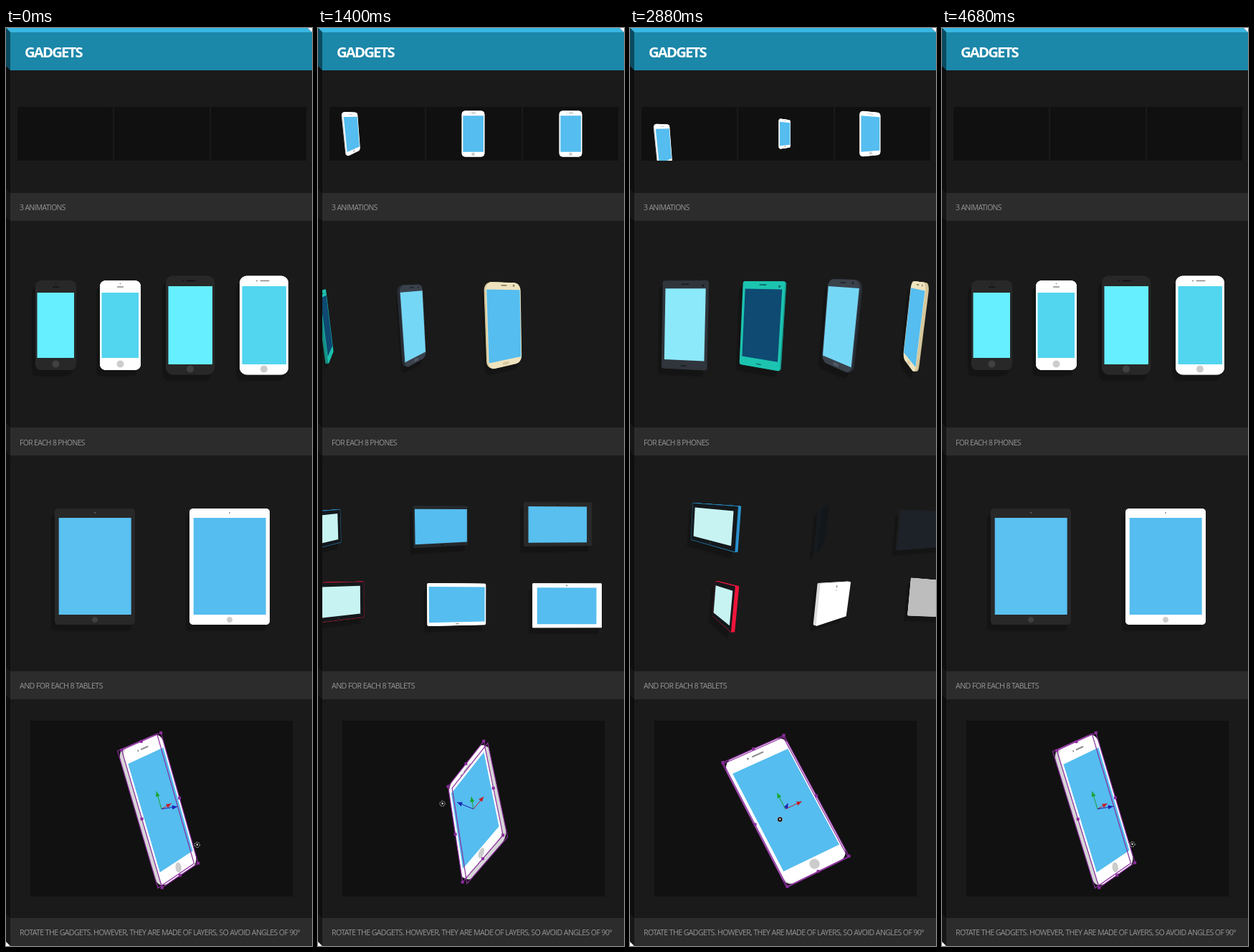
These frames come from a looping animation (427 by 1280 pixels, 4.72 s). An HTML page with a canvas:

```html
<!DOCTYPE html>
<html lang="en">
<head>
<meta charset="utf-8">
<title>Gadgets</title>
<style>
html, body { margin: 0; width: 100%; height: 100%; overflow: hidden; background: #1a1a1a; }
canvas { position: absolute; left: 0; top: 0; }
span {
  position: absolute; left: 19px; transform: translateY(-50%); white-space: nowrap; line-height: 1;
  font-family: "Open Sans", "Noto Sans", Roboto, sans-serif; font-stretch: 62.5%; font-weight: 400;
  letter-spacing: -.06em; color: #959595;
}
.title { left: 26px; font-weight: 700; letter-spacing: -.09em; color: #fff; }
</style>
</head>
<body>
<canvas id="stage" width="427" height="1280"></canvas>
<span class="title" style="top:33px" data-w="80" data-max="31">GADGETS</span>
<span style="top:250px" data-w="64" data-max="15">3 ANIMATIONS</span>
<span style="top:578px" data-w="91" data-max="15">FOR EACH 8 PHONES</span>
<span style="top:917px" data-w="116" data-max="15">AND FOR EACH 8 TABLETS</span>
<span style="top:1261px" data-w="392" data-max="15">ROTATE THE GADGETS. HOWEVER, THEY ARE MADE OF LAYERS, SO AVOID ANGLES OF 90°</span>
<script>
const ctx = document.getElementById('stage').getContext('2d');
const LOOP = 4720, TURN = LOOP / 2, CLIP = 2320, STEP = 40;
const SKY = '#55bdef', PURPLE = '#8a2c9c';
const THICK = 5;

// Largest font size that keeps each line inside its column
for (const el of document.querySelectorAll('span')) {
  el.style.fontSize = '100px';
  const full = el.getBoundingClientRect().width;
  el.style.fontSize = Math.min(el.dataset.max, 100 * el.dataset.w / full) + 'px';
}

const clamp = x => Math.min(1, Math.max(0, x));
const smooth = x => { x = clamp(x); return x * x * (3 - 2 * x); };
const rad = deg => deg * Math.PI / 180;

// ---- 3D: returns a function from gadget space to the stage ----
// Positive yaw brings the right side nearer, positive pitch sends the bottom away.
function view({ x, y, yaw = 0, pitch = 0, roll = 0, size = 1, k = 1, depth = 300 }) {
  const [cy, sy, cp, sp, cr, sr] = [yaw, pitch, roll].flatMap(a => [Math.cos(rad(a)), Math.sin(rad(a))]);
  return (px, py, pz = 0) => {
    const x1 = px * cy + pz * sy, z1 = pz * cy - px * sy;
    const y1 = py * cp - z1 * sp, z2 = py * sp + z1 * cp;
    const f = size * depth / (depth / k + z2 * size);
    return [x + (x1 * cr - y1 * sr) * f, y + (x1 * sr + y1 * cr) * f];
  };
}

// ---- drawing ----
function trace(points) {
  ctx.beginPath();
  points.forEach(([x, y]) => ctx.lineTo(x, y));
  ctx.closePath();
}

function poly(points, fill) {
  trace(points);
  ctx.fillStyle = fill;
  ctx.fill();
}

function bar(x, y, w, h, fill) {
  ctx.fillStyle = fill;
  ctx.fillRect(x, y, w, h);
}

function clipped(x, y, w, h, draw) {
  ctx.save();
  ctx.beginPath();
  ctx.rect(x, y, w, h);
  ctx.clip();
  draw();
  ctx.restore();
}

// Rounded box in the gadget's own coordinates, origin at its top left
function box(k, at, [x, y, w, h], r, fill, z = 0, dx = 0, dy = 0) {
  const pts = [];
  for (let c = 0; c < 4; c++) {
    const cx = c < 2 ? x + w - r : x + r, cy = c % 3 ? y + h - r : y + r;
    for (let i = 0; i <= 5; i++) {
      const a = (c - 1 + i / 5) * Math.PI / 2;
      const p = at(cx + r * Math.cos(a) - k.w / 2, cy + r * Math.sin(a) - k.h / 2, z);
      pts.push([p[0] + dx, p[1] + dy]);
    }
  }
  poly(pts, fill);
}

const corners = (k, at, z = 0) =>
  [[-1, -1], [1, -1], [1, 1], [-1, 1]].map(([u, v]) => at(u * k.w / 2, v * k.h / 2, z));

function facesUs(k, at) {
  const [a, b, c, d] = corners(k, at);
  return (c[0] - a[0]) * (d[1] - b[1]) > (d[0] - b[0]) * (c[1] - a[1]);
}

function device(k, at, shadow) {
  const shell = (fill, z, dx, dy) => box(k, at, [0, 0, k.w, k.h], k.r, fill, z, dx, dy);
  const front = facesUs(k, at), face = front ? 0 : THICK;
  const pill = ([x, y, w, h, fill]) => box(k, at, [x - w / 2, y - h / 2, w, h], Math.min(w, h) / 2, fill, face);
  if (shadow) {
    shell('rgba(0,0,0,.13)', 0, -4.5, 8);
    shell('rgba(0,0,0,.13)', 0, -5.5, 9.5);
  }
  for (let z = 0; z < THICK; z++) shell(k.side, front ? THICK - z : z);
  if (!front) {
    shell(k.back, THICK);
    k.rear.forEach(pill);
    return;
  }
  shell(k.rim || k.body);
  if (k.rim) box(k, at, [.8, .8, k.w - 1.6, k.h - 1.6], k.r, k.body);
  box(k, at, k.glass, 0, k.screen);
  k.parts.forEach(pill);
}

// ---- gadget kinds: size, corner radius, screen box, buttons as [x, y, w, h, colour] ----
const kind = (w, h, r, glass, parts, look) => ({ w, h, r, glass, parts, rear: [], back: look.body, ...look });
const dark = { body: '#282828', side: '#1f1f1f', back: '#202020', screen: '#66efff', btn: '#404040', ear: '#111' };
const white = { body: '#fff', side: '#d6d6d6', back: '#e2e2e2', screen: '#52d5ef', btn: '#ccc', ear: '#888' };

const small = look => kind(57, 125, 8, [2.5, 17, 51.5, 91],
  [[28.5, 116.5, 10, 10, look.btn], [28.5, 9, 9, 1.6, look.ear], [28.5, 4.5, 1.7, 1.7, look.ear]], look);
const large = look => kind(68, 138, 10, [3.5, 14.5, 61.5, 109],
  [[34, 130, 10, 10, look.btn], [35, 7, 13, 1.4, look.ear], [24, 7, 2, 2, look.ear]], look);
const slab = look => kind(65, 125, 3, [4, 11, 57, 101],
  [[32, 5, 11, 1.6, look.ear], [57, 7, 3, 3, look.ear], [32, 120, 8, 1.2, look.ear]],
  { rear: [[17, 11, 8, 8, look.ear], [32, 12, 4, 4, look.ear]], ...look });
const round = look => kind(66, 133, 12, [1.5, 11, 63, 111.5],
  [[33, 128, 13, 5, look.btn], [33, 4.5, 11, 1.6, look.ear], [52, 4.5, 3.4, 3.4, look.ear]], look);
const pad = look => kind(112, 162, 5, [5.7, 13, 101, 135],
  [[56, 155, 8, 8, look.btn], [56, 6, 1.8, 1.8, '#777']], look);
const edge = look => kind(98, 60, 1, [7, 7, 83, 46], [[48, 56.5, 3, 3, '#2b3236']],
  { body: '#14181b', screen: '#c8f3f3', rear: [[93, 6, 3.5, 3.5, '#123']], ...look });
const wide = look => kind(86, 61, 2, [2.2, 5, 82, 51], [[43, 58.5, 5, 1.4, look.ear]],
  { rear: [[43, 6, 4, 4, look.ear], [43, 12, 2, 2, look.ear]], ...look });
const frame = look => kind(97, 62, 1, [6.5, 6, 83, 51], [[48, 3, 2, 2, look.ear]], look);

const hero = large({ ...white, screen: SKY });
const graphite = slab({ body: '#30353c', side: '#20252b', back: '#222931', screen: '#8be9fa', ear: '#14181d' });
const teal = slab({ body: '#1cc4b0', side: '#168e84', screen: '#0e4a72', ear: '#0c5f58' });
const slate = round({ body: '#3a414b', side: '#272d35', screen: '#75d7f6', btn: '#505965', ear: '#1d2229' });
const cream = round({ body: '#efe3be', side: '#d5c79c', screen: SKY, btn: '#d6c9a1', ear: '#77705d' });
const blueEdge = edge({ rim: '#2276a6', side: '#2b93d0', back: '#2590cf' });
const redEdge = edge({ rim: '#8c1730', side: '#f0153c', back: '#e8113a' });
const wideDark = wide({ body: '#25282b', side: '#171b1f', back: '#12171b', screen: SKY, ear: '#15181a' });
const wideWhite = wide({ body: '#fff', side: '#ddd', screen: SKY, ear: '#999' });
const frameDark = frame({ body: '#292929', side: '#1e1e1e', back: '#1d2228', screen: '#58bfef', ear: '#151515' });
const frameWhite = frame({ body: '#fff', side: '#ccc', back: '#bdbdbd', screen: SKY, ear: '#777' });

// ---- groups; every later item leaves and arrives a little earlier ----
const phoneMove = { leave: 398, leaveGap: 98, spin: 975, reach: 1, enter: 1390, enterGap: 120, settle: 850 };
const groups = [
  { turn: 0, mid: 413, ...phoneMove,
    items: [[small(dark), 69.5, 414.5], [small(white), 159.5, 414.5], [large(dark), 257, 414.5], [large(white), 360, 414.5]] },
  { turn: 1, mid: 413, ...phoneMove,
    items: [[graphite, 70.5, 414.5], [teal, 167.5, 414.5], [slate, 267, 414], [cream, 363, 414.5]] },
  { turn: 0, mid: 747, leave: 220, leaveGap: 60, spin: 800, reach: 1.9, enter: 1160, enterGap: 120, settle: 850,
    items: [[pad({ ...dark, screen: '#5ac1f1' }), 124, 751], [pad({ ...white, screen: SKY }), 312, 751]] },
  { turn: 1, mid: 747, leave: 282, leaveGap: 66, spin: 700, reach: 1.2, enter: 1162, enterGap: 72, settle: 650,
    items: [[blueEdge, 90, 691], [redEdge, 90, 805.5], [wideDark, 221, 691], [wideWhite, 221, 806],
      [frameDark, 348, 691], [frameWhite, 350, 805.5]] }
];

// Leaving: spin to the back while speeding off to the right and away
function leaving(g, time) {
  const u = Math.max(0, time) / 800, lean = smooth(u / .6);
  return {
    dx: g.reach * (190 * u ** 2 + 67 * u ** 6), k: 1 / (1 + .42 * u * u),
    yaw: 180 * smooth(time / g.spin), pitch: 12 * lean, roll: 7 * lean
  };
}

// Arriving: slow down from the left while turning to the front
function arriving(g, time) {
  const v = Math.max(0, 1 - time / g.settle) ** 2;
  return { dx: -300 * v, k: 1 / (1 + .42 * v), yaw: -110 * v, pitch: 12 * Math.min(1, 1.6 * v), roll: -14 * v * v };
}

function playGroup(g, t) {
  const local = (t + LOOP - g.turn * TURN) % LOOP;
  g.items.forEach(([k, x, y], i) => {
    const pose = local < TURN
      ? leaving(g, local - g.leave + i * g.leaveGap)
      : arriving(g, local - TURN - g.enter + i * g.enterGap);
    const px = 213 + (x - 213 + pose.dx) * pose.k, py = g.mid + (y - g.mid) * pose.k;
    if (px > -120 && px < 560) device(k, view({ ...pose, x: px, y: py }), true);
  });
}

// ---- three intro clips: rise, grow and slide ----
function playClips(t) {
  const v = (1 - clamp((t - 384) / 400)) ** 3;
  const out = Math.max(0, (t - 1900) / 340) ** 3;
  const grow = (1 - (1 - clamp((t - 469) / 325)) ** 3) * (1 - clamp((t - 2000) / 200) ** 2);
  const poses = [
    { x: 48, y: 147 + 95 * v - 54 * out, yaw: -45, pitch: 8, roll: -5, k: .9 },
    { x: 216.5, y: 147.5, yaw: -100 * (1 - grow), size: .465 * grow },
    { x: 352.5 - 95 * v + 80 * out, y: 147.5, yaw: 40 * out - 110 * v, k: 1 - .25 * v }
  ];
  poses.forEach((pose, i) => {
    const x = 16 + 135 * i, w = 133;
    bar(x, 110, w, 75, '#101010');
    if (pose.size === 0) return;
    clipped(x, 110, w, 75, () => device(hero, view({ size: .465, depth: 110, ...pose })));
  });
}

// ---- the dragged phone with its bounding box and axes ----
function arrow([x, y], [tx, ty], color) {
  const a = Math.atan2(ty - y, tx - x), c = Math.cos(a), s = Math.sin(a);
  ctx.strokeStyle = color;
  ctx.beginPath();
  ctx.moveTo(x, y);
  ctx.lineTo(tx, ty);
  ctx.stroke();
  const bx = tx - 7 * c, by = ty - 7 * s;
  poly([[tx, ty], [bx - 3 * s, by + 3 * c], [bx + 3 * s, by - 3 * c]], color);
}

function gizmo(k, at) {
  ctx.strokeStyle = PURPLE;
  ctx.lineWidth = 1.2;
  for (const z of [THICK, 0]) {
    trace(corners(k, at, z));
    ctx.stroke();
  }
  const box = corners(k, at);
  box.forEach(([x, y], i) => {
    const [nx, ny] = box[(i + 1) % 4];
    bar(x - 2, y - 2, 4, 4, PURPLE);
    bar((x + nx) / 2 - 2, (y + ny) / 2 - 2, 4, 4, PURPLE);
  });
  ctx.lineWidth = 1;
  arrow(at(0, 0), at(0, -18), '#18a52c');
  arrow(at(0, 0), at(18, 0), '#c4202a');
  arrow(at(0, 0), at(0, 0, -19), '#1c22b4');
}

function pointer(x, y) {
  ctx.beginPath();
  ctx.arc(x, y, 3.6, 0, 7);
  ctx.fillStyle = '#111';
  ctx.fill();
  ctx.strokeStyle = '#ccc';
  ctx.lineWidth = .9;
  ctx.setLineDash([2, 1]);
  ctx.stroke();
  ctx.setLineDash([]);
  bar(x - 1, y - 1.5, 2, 2.5, '#ddd');
}

function playDrag(t) {
  const p = ((1 - Math.cos(2 * Math.PI * (t + 20) / CLIP)) / 2) ** .85;
  const at = view({
    x: 217, y: 1089, size: 1.43, depth: 1300,
    yaw: 127 * p * p - 53, pitch: 10 - 71 * p * p, roll: 82 * p * p - 67 * p - 16
  });
  bar(34, 966, 366, 245, '#111');
  device(hero, at);
  gizmo(hero, at);
  pointer(267 - 104 * p, 1139 - 64 * p);
}

function chrome() {
  bar(0, 0, 6, 1280, '#0e0e0e');
  poly([[0, 0], [421, 0], [427, 6], [6, 6]], '#38b7e2');
  poly([[421, 0], [427, 0], [427, 6]], '#fff');
  poly([[0, 0], [6, 6], [6, 59], [0, 53]], '#0a4b60');
  bar(6, 6, 421, 53, '#1b87a9');
  for (const y of [230, 557, 897, 1241]) {
    bar(6, y, 421, 39, '#2c2c2c');
    poly([[0, y - 6], [6, y], [6, y + 39], [0, y + 33]], '#171717');
  }
  poly([[0, 1274], [6, 1280], [0, 1280]], '#fff');
}

function render(now) {
  const t = Math.floor((now % LOOP) / STEP) * STEP;
  bar(0, 0, 427, 1280, '#1a1a1a');
  playClips(t % CLIP);
  clipped(6, 269, 421, 288, () => groups.slice(0, 2).forEach(g => playGroup(g, t)));
  clipped(6, 597, 421, 300, () => groups.slice(2).forEach(g => playGroup(g, t)));
  playDrag(t % CLIP);
  chrome();
}

const start = performance.now();
function tick() {
  render(performance.now() - start);
  requestAnimationFrame(tick);
}
tick();
</script>
</body>
</html>
```
